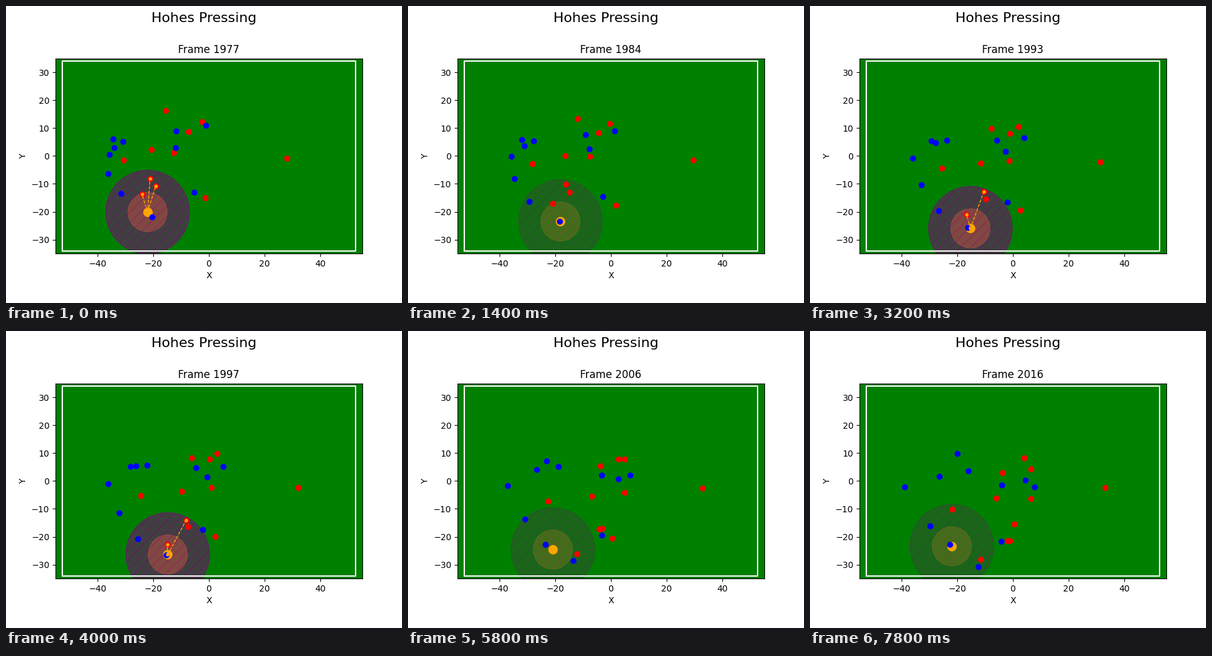
Write a matplotlib script that moves like this. It is 640 by 480 pixels and loops after 8 s.

```python
import numpy as np
import matplotlib.pyplot as plt
from matplotlib.animation import FuncAnimation
from matplotlib.patches import Circle

FRAMES, INTERVAL, FIRST = 40, 200, 1977
HALF, LAST = 20, FRAMES - 1
OUTER, INNER = 15, 7


class Run:
    """Straight run towards mid that bends away to reach end.

    ease > 0 holds the first direction longer, ease < 0 turns sooner.
    """

    def __init__(self, start, mid, end, ease=0.018):
        self.start, mid, end = map(np.array, (start, mid, end))
        self.step = (mid - self.start) / HALF
        self.turn = end - self.start - self.step * LAST
        self.ease = ease

    def at(self, t):
        bend = t * (t - HALF) / (LAST * (LAST - HALF))
        bend *= 1 + self.ease * (t - LAST)
        return self.start + self.step * t + self.turn * bend

    def velocity(self, t):
        return self.at(t + 0.1) - self.at(t - 0.1)


red = [
    Run((-15.5, 16.3), (-6.2, 8.3), (-3.8, 3.0)),
    Run((-2.4, 12.3), (2.9, 9.8), (6.4, 4.3)),
    Run((-7.3, 8.7), (0.2, 7.9), (4.0, 8.3)),
    Run((-20.6, 2.3), (-9.8, -3.7), (-6.0, -6.1)),
    Run((-12.6, 1.2), (0.9, -2.4), (6.4, -6.3)),
    Run((-30.6, -1.5), (-24.4, -5.2), (-21.7, -10.1)),
    Run((27.9, -0.8), (31.9, -2.4), (33.0, -2.4)),
    Run((-21.1, -8.1), (-8.2, -14.1), (-2.0, -21.4)),
    Run((-19.1, -10.8), (-7.5, -16.3), (0.4, -15.4)),
    Run((-24.0, -13.7), (-14.9, -22.8), (-11.5, -28.1), ease=0.03),
    Run((-1.3, -15.0), (2.2, -19.9), (-1.1, -21.4), ease=-0.04),
]

blue = [
    Run((-34.4, 6.1), (-28.2, 5.2), (-26.4, 1.6)),
    Run((-30.8, 5.2), (-22.2, 5.6), (-16.0, 3.6)),
    Run((-33.9, 3.0), (-26.2, 5.4), (-20.0, 9.8)),
    Run((-35.7, 0.5), (-36.1, -1.0), (-38.8, -2.1)),
    Run((-36.1, -6.3), (-32.2, -11.4), (-29.7, -16.1)),
    Run((-31.5, -13.4), (-25.5, -20.8), (-22.6, -22.8)),
    Run((-11.8, 9.0), (-4.7, 4.7), (-4.0, -1.5)),
    Run((-12.0, 3.0), (-0.7, 1.4), (4.4, 0.3)),
    Run((-1.1, 11.0), (5.1, 5.2), (7.8, -2.1)),
    Run((-5.3, -13.0), (-2.2, -17.4), (-4.2, -21.6), ease=-0.04),
    Run((-20.4, -21.9), (-15.3, -26.5), (-12.4, -30.7)),
]


def ball_at(t):
    """Dribble, pass back, short settling touch; each leg slows to a stop."""
    stops = np.array([(-22.0, -20.1), (-14.7, -26.4), (-22.1, -24.2), (-21.9, -23.4)])
    times = (0, 22, 34, LAST)
    pos = stops[0]
    for i in range(3):
        s = np.clip((t - times[i]) / (times[i + 1] - times[i]), 0, 1)
        pos = pos + (stops[i + 1] - stops[i]) * (1 - (1 - s) ** 2)
    return pos


fig, ax = plt.subplots(figsize=(6.4, 4.8), dpi=100)
fig.suptitle("Hohes Pressing", fontsize=16)
ax.set(xlim=(-55, 55), ylim=(-35, 35), xlabel="X", ylabel="Y", aspect="equal", facecolor="green")
ax.plot([-52.5, 52.5, 52.5, -52.5, -52.5], [-34, -34, 34, 34, -34], color="white")

zones = [Circle((0, 0), INNER, color="orange", hatch="//"),
         Circle((0, 0), OUTER, color="purple", hatch="//")]
for zone in zones:
    ax.add_patch(zone)

ball_dot, = ax.plot([], [], "o", color="orange", ms=10)
red_dots, = ax.plot([], [], "o", color="red")
blue_dots, = ax.plot([], [], "o", color="blue")
links = [ax.plot([], [], "o--", color="orange", lw=1, ms=3)[0] for _ in red]


def update(n):
    ball = ball_at(n)
    reds = np.array([p.at(n) for p in red])
    blues = np.array([p.at(n) for p in blue])

    # Pressing: someone closing in on the ball inside the inner zone
    gap = ball - reds
    dist = np.hypot(*gap.T)
    speed = np.array([p.velocity(n) for p in red])
    closing = (gap * speed).sum(axis=1) > 0
    pressing = np.any(closing & (dist < INNER))

    for zone in zones:
        zone.center = ball
        zone.set_alpha(0.5 if pressing else 0.2)
    for link, pos, near in zip(links, reds, closing & (dist < OUTER)):
        link.set_data(*zip(ball, pos))
        link.set_visible(bool(pressing and near))

    ball_dot.set_data(ball[:1], ball[1:])
    red_dots.set_data(*reds.T)
    blue_dots.set_data(*blues.T)
    ax.set_title(f"Frame {FIRST + n}")


anim = FuncAnimation(fig, update, frames=FRAMES, interval=INTERVAL, repeat=True)
plt.show()
```
